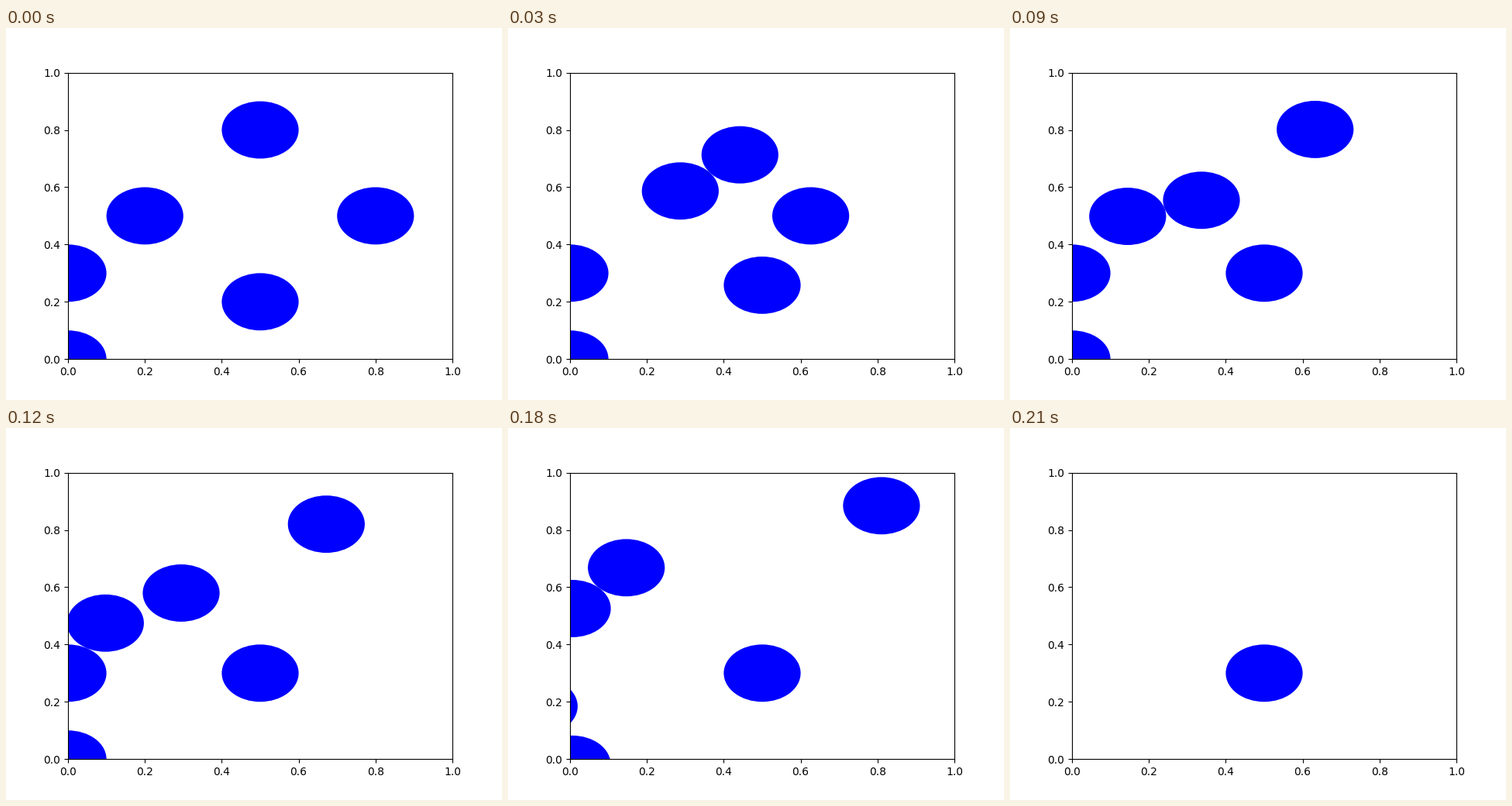
A matplotlib script that plays this animation: 640 by 480 pixels, repeating every 1.29 s.

```python
from itertools import combinations

import matplotlib.pyplot as plt
import numpy as np
from matplotlib.animation import FuncAnimation
from matplotlib.patches import Circle

RADIUS = 0.1
END_TIME = 1.0
INTERVAL = 30
FRAMES = 43

START = [(0.2, 0.5), (0.5, 0.8), (0.8, 0.5), (0.5, 0.2), (0, 0.3), (0, 0)]
VELOCITY = [(3, 3), (-2, -3), (-6, 0), (0, 2), (0, 0), (0, 0)]


def time_to_contact(gap, speed):
    """Time until two discs touch, or infinity if they never do."""
    approach = gap @ speed
    if approach >= -1e-12:
        return np.inf
    a = speed @ speed
    disc = approach**2 - a * (gap @ gap - 4 * RADIUS**2)
    return (-approach - np.sqrt(disc)) / a if disc > 0 else np.inf


def collision_states():
    """Positions at the start, at each elastic collision and at the end."""
    pos = np.array(START, dtype=float)
    vel = np.array(VELOCITY, dtype=float)
    states = [pos.copy()]
    clock = 0.0
    while True:
        wait, i, j = min(
            (time_to_contact(pos[j] - pos[i], vel[j] - vel[i]), i, j)
            for i, j in combinations(range(len(pos)), 2)
        )
        if clock + wait >= END_TIME:
            states.append(pos + vel * (END_TIME - clock))
            return states
        pos += vel * wait
        clock += wait
        normal = (pos[j] - pos[i]) / (2 * RADIUS)
        impulse = ((vel[j] - vel[i]) @ normal) * normal
        vel[i] += impulse
        vel[j] -= impulse
        states.append(pos.copy())


states = collision_states()

fig, ax = plt.subplots(figsize=(6.4, 4.8), dpi=100)
ax.set(xlim=(0, 1), ylim=(0, 1))
balls = [ax.add_patch(Circle(p, RADIUS, fc="blue", lw=0)) for p in START]


def update(frame):
    for ball, center in zip(balls, states[min(frame, len(states) - 1)]):
        ball.center = center
    return balls


anim = FuncAnimation(fig, update, frames=FRAMES, interval=INTERVAL,
                     repeat=True, repeat_delay=0)
plt.show()
```
